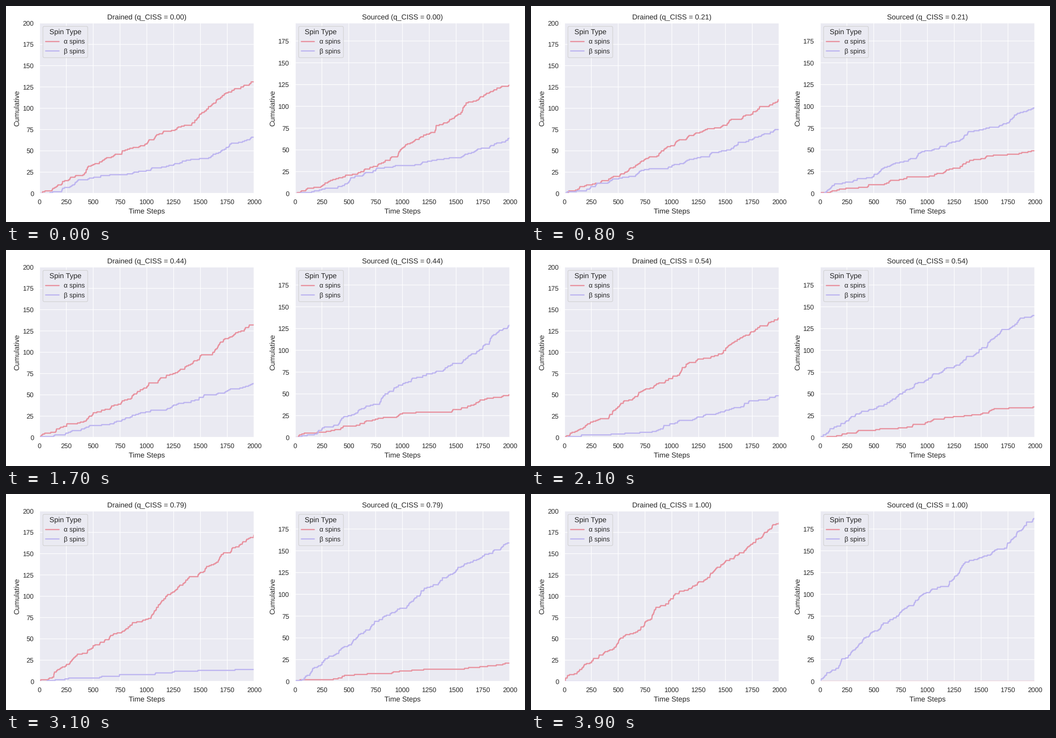
Write a matplotlib script that moves like this. It is 1159 px wide and 483 px high and loops after 4 s.

```python
import numpy as np
import matplotlib.pyplot as plt
from matplotlib.animation import FuncAnimation

W, H, DPI = 1159, 483, 96
FRAMES, INTERVAL = 40, 100
STEPS = 2000
K = 1.006  # type and line scale
ALPHA, BETA = "#e8929f", "#bdb5f0"
INK, PANEL = "#262626", "#eaeaf2"

# Final counts as q grows; runs in between drift from one key to the next.
Q_KEYS = [0, 0.13, 0.31, 0.44, 0.64, 0.79, 1]
FINALS = [
    [136, 78, 132, 133, 151, 172, 187],  # drained alpha
    [73, 73, 69, 66, 32, 15, 0],         # drained beta
    [126, 45, 62, 44, 22, 21, 0],        # sourced alpha
    [63, 83, 119, 132, 150, 158, 187],   # sourced beta
]

steps = np.arange(STEPS + 1)


def staircase(total, power, rng):
    """Count `total` events with uneven gaps that speed up by `power`."""
    gaps = rng.gamma(0.75, size=total + 1)
    progress = np.cumsum(gaps)[:-1] / gaps.sum()
    times = STEPS * progress ** (1 / power)
    return np.searchsorted(times, steps, side="right")


def run(frame):
    rng = np.random.default_rng(100 + frame)
    q = frame / (FRAMES - 1)
    curves = []
    for finals in FINALS:
        total = np.interp(q, Q_KEYS, finals) + rng.normal(0, 4 * (1 - q))
        curves.append(staircase(max(0, round(total)), 1.2 - 0.2 * q, rng))
    return curves


plt.rcParams.update({
    "font.family": ["Liberation Sans", "DejaVu Sans"],
    "text.hinting": "no_hinting",
    "text.color": INK, "axes.labelcolor": INK,
    "xtick.color": INK, "ytick.color": INK,
    "axes.facecolor": PANEL, "axes.edgecolor": "white",
    "axes.linewidth": 1.25 * K, "axes.axisbelow": True,
    "lines.solid_capstyle": "round",
    "axes.titlesize": 12 * K, "axes.labelsize": 12 * K,
    "xtick.labelsize": 11 * K, "ytick.labelsize": 11 * K,
    "legend.fontsize": 11 * K, "legend.title_fontsize": 12 * K,
})

fig = plt.figure(figsize=(W / DPI, H / DPI), dpi=DPI, facecolor="white")


def panel(left, right, top_value):
    top, bottom = 37.8, 419.1
    ax = fig.add_axes([left / W, 1 - bottom / H, (right - left) / W, (bottom - top) / H])
    ax.set(xlim=(0, STEPS), ylim=(0, top_value), xlabel="Time Steps", ylabel="Cumulative")
    ax.set_xticks(range(0, STEPS + 1, 250))
    ax.set_yticks(range(0, int(top_value) + 1, 25))
    ax.grid(color="white", linewidth=K, linestyle="-", snap=False)
    ax.tick_params(axis="x", length=0, pad=9.9)
    ax.tick_params(axis="y", length=0, pad=9.5)
    lines = [ax.plot([], [], color=color, lw=2 * K, label=label)[0]
             for color, label in ((ALPHA, "α spins"), (BETA, "β spins"))]
    ax.legend(title="Spin Type", loc="upper left")
    return ax, lines


drained, drained_lines = panel(74.8, 554.2, 200.2)
sourced, sourced_lines = panel(645.5, 1125.2, 195.8)
lines = drained_lines + sourced_lines
runs = [run(i) for i in range(FRAMES)]


def update(frame):
    q = frame / (FRAMES - 1)
    for line, curve in zip(lines, runs[frame]):
        line.set_data(steps, curve)
    titles = [ax.set_title(f"{name} (q_CISS = {q:.2f})")
              for ax, name in ((drained, "Drained"), (sourced, "Sourced"))]
    return lines + titles


anim = FuncAnimation(fig, update, frames=FRAMES, interval=INTERVAL,
                     repeat=True, repeat_delay=0, blit=False)
plt.show()
```
